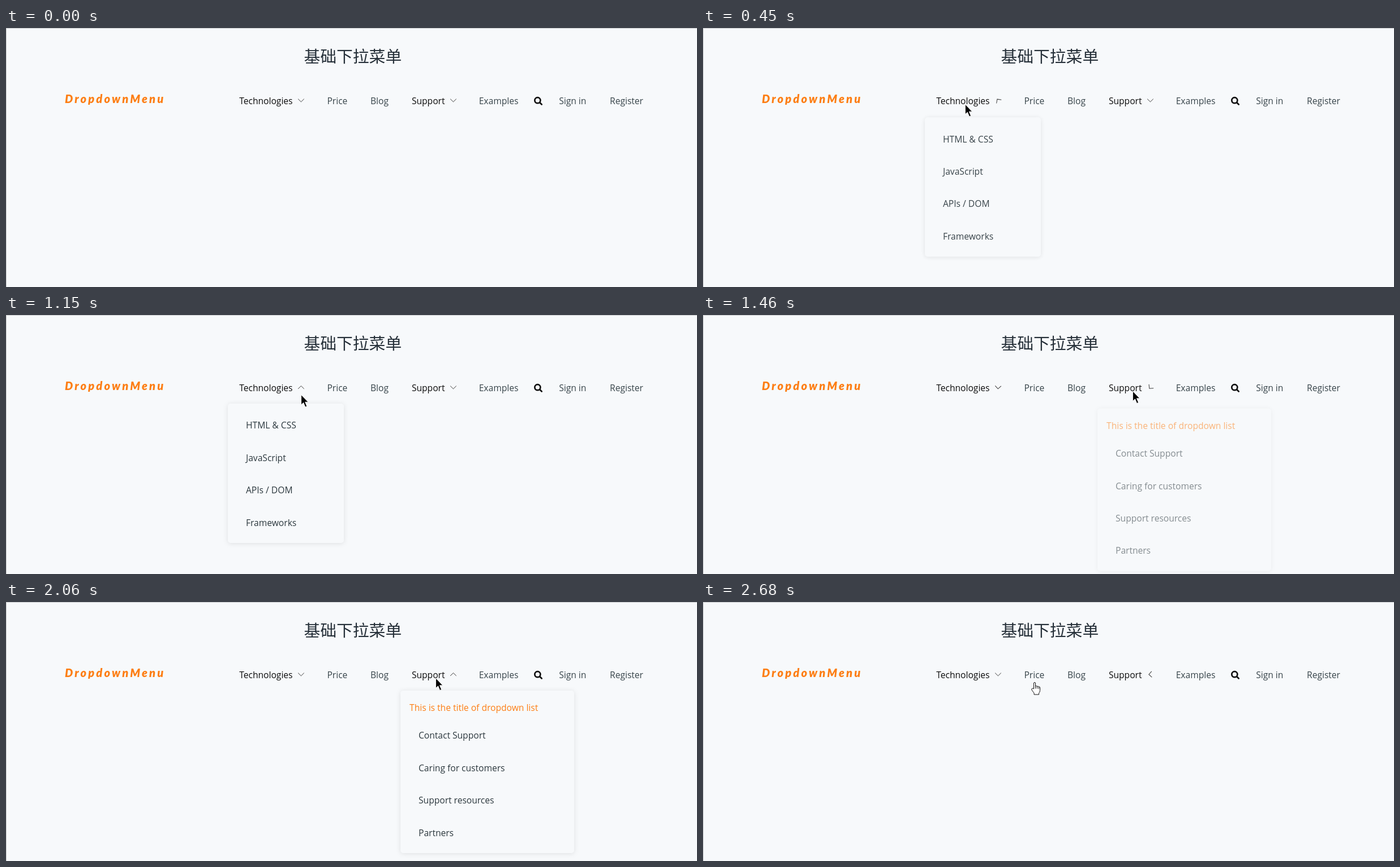
Animation, 1221 px wide and 459 px high, one loop 2770 ms. Source, as an HTML page:

```html
<!DOCTYPE html>
<html lang="en">
<head>
<meta charset="utf-8">
<title>Dropdown menu</title>
<style>
  html, body { margin: 0; width: 100%; height: 100%; overflow: hidden; background: #f7f9fb; }
  svg { display: block; width: 100%; height: 100%; }
  text { font: 15.6px "Open Sans", "Noto Sans", sans-serif; fill: #2c383e; }
  .nav { text-anchor: middle; fill: #37444a; }
  .strong { fill: #0c0c0c; }
  .heading { font: 28.8px "Noto Sans CJK SC", "Noto Sans CJK", sans-serif; fill: #252f38; text-anchor: middle; }
  .brand { font: italic 900 20px Lato, sans-serif; letter-spacing: 3.15px; fill: #fd7e14; }
  .caption { fill: #fd7e14; }
  .panel { fill: #f7f9fb; filter: drop-shadow(0 1px 4px rgba(0, 0, 0, .1)); }
  .hover { fill: #ececec; }
  .chevron { fill: none; stroke: #3c3c3c; stroke-width: 1; }
  .search { fill: none; stroke: #101010; stroke-width: 2.7; stroke-linecap: round; }
</style>
</head>
<body>
<svg id="stage" viewBox="0 0 1221 459" xmlns="http://www.w3.org/2000/svg">
  <path d="M0 .5H1221M.5 0V459" stroke="#c6c8ca"/>
  <text class="heading" x="612.8" y="61.3">基础下拉菜单</text>
  <text class="brand" x="104" y="133">DropdownMenu</text>
  <g class="search"><circle cx="939.3" cy="128.2" r="5"/><path d="M943.3 132.2L946.6 135.5"/></g>
</svg>
<script>
const LOOP = 2770, STEP = LOOP / 36;
const OPEN_MS = 500, CLOSE_MS = 300, SLIDE = 20;
const ITEM_HEIGHT = 57.4, PANEL_TOP = 157;
const stage = document.getElementById("stage");

function add(parent, tag, attrs, text = "") {
  const el = document.createElementNS("http://www.w3.org/2000/svg", tag);
  for (const key in attrs) el.setAttribute(key, attrs[key]);
  el.textContent = text;
  return parent.appendChild(el);
}

function bezier(x1, y1, x2, y2) {
  const at = (a, b, s) => 3 * a * s * (1 - s) ** 2 + 3 * b * s * s * (1 - s) + s ** 3;
  return x => {
    if (x <= 0) return 0;
    if (x >= 1) return 1;
    let low = 0, high = 1;
    for (let i = 0; i < 24; i++) {
      const mid = (low + high) / 2;
      if (at(x1, x2, mid) < x) low = mid; else high = mid;
    }
    return at(y1, y2, low);
  };
}
const ease = bezier(.25, .1, .25, 1);
const easeInOut = bezier(.42, 0, .58, 1);

const navItems = [
  ["Technologies", 459.4, "strong"], ["Price", 585.4], ["Blog", 660],
  ["Support", 746.2, "strong"], ["Examples", 870.5], ["Sign in", 1001.3], ["Register", 1096.5]
];
for (const [label, x, extra = ""] of navItems)
  add(stage, "text", { class: "nav " + extra, x, y: 135 }, label);

function createMenu({ x, width, height, itemsTop, labels, caption, chevronX, opens, closes }) {
  const group = add(stage, "g", {});
  add(group, "rect", { class: "panel", x, y: PANEL_TOP, width, height, rx: 5 });
  const hover = add(group, "rect", { class: "hover", x: x + 8, width: width - 16, height: ITEM_HEIGHT });
  if (caption) add(group, "text", { class: "caption", x: x + 16, y: 193.3 }, caption);
  labels.forEach((label, i) =>
    add(group, "text", { x: x + 32, y: itemsTop + 35.4 + i * ITEM_HEIGHT }, label));
  const chevron = add(stage, "path", { class: "chevron", d: "M-5.3 -2.6L0 2.6L5.3 -2.6" });

  const isOpen = time => time >= opens && time < closes;
  const itemAt = (time, point) => {
    const index = Math.floor((point.y - itemsTop) / ITEM_HEIGHT);
    const inside = point.x > x + 8 && point.x < x + width - 8;
    return isOpen(time) && inside && index >= 0 && index < labels.length ? index : -1;
  };

  function draw(time, point) {
    const progress = (time - opens) / OPEN_MS;
    const shown = isOpen(time) ? ease(progress) : 0;
    group.setAttribute("opacity", shown);
    group.setAttribute("transform", `translate(0 ${SLIDE * (1 - shown)})`);
    const turn = time < closes ? easeInOut(progress) : 1 - easeInOut((time - closes) / CLOSE_MS);
    chevron.setAttribute("transform", `translate(${chevronX} 128.3) rotate(${180 * turn})`);
    const index = itemAt(time, point);
    hover.setAttribute("visibility", index < 0 ? "hidden" : "visible");
    hover.setAttribute("y", itemsTop + Math.max(index, 0) * ITEM_HEIGHT);
  }
  return { draw, itemAt };
}

const menus = [
  createMenu({
    x: 392, width: 205, height: 247, itemsTop: 166, chevronX: 521.4, opens: 115, closes: 1190,
    labels: ["HTML & CSS", "JavaScript", "APIs / DOM", "Frameworks"]
  }),
  createMenu({
    x: 697, width: 307, height: 288, itemsTop: 207, chevronX: 790.4, opens: 1300, closes: 2540,
    caption: "This is the title of dropdown list",
    labels: ["Contact Support", "Caring for customers", "Support resources", "Partners"]
  })
];

const arrow = add(stage, "path", {
  d: "M0 0V17.5L4 13.8L7.2 21.5L10 20.3L6.9 12.8H12.2Z",
  fill: "#000", stroke: "#fff", "stroke-width": .8
});
const hand = add(stage, "path", {
  d: "M-1.5 11.5V1.5Q-1.5 0 0 0T1.5 1.5V6.5Q3 5.3 4.3 7Q6 6 7.2 7.8Q9.5 7 9.5 9.5V14" +
     "Q9.5 17 7.5 19V21.5H-1V19L-5 13.5Q-6 11 -4 10.5Q-2.5 10.3 -1.5 11.5Z" +
     "M1.5 6.5V11M4.3 7V11M7.2 7.8V11.5",
  fill: "#fff", stroke: "#111", "stroke-width": 1, "stroke-linejoin": "round"
});

// Pointer route: time, x, y
const route = [
  [70, 468, 148], [150, 462, 125], [310, 462, 125], [530, 464, 140], [600, 468, 160],
  [690, 476, 205], [769, 479.8, 238], [846, 483, 249], [923, 488, 235], [1000, 497, 200],
  [1077, 505, 162], [1154, 521.5, 141.5], [1231, 588, 143], [1308, 657, 144], [1385, 730, 140],
  [1462, 759.5, 135], [2060, 759.5, 135], [2154, 764, 165], [2231, 772, 200], [2308, 778, 235],
  [2370, 779.5, 246.5], [2462, 779.5, 246.5], [2539, 768, 190], [2616, 690, 150], [2693, 586, 142.5]
];

function pointerAt(time) {
  const next = route.findIndex(stop => stop[0] > time);
  if (next < 1) {
    const [, x, y] = route[next < 0 ? route.length - 1 : 0];
    return { x, y };
  }
  const [t0, x0, y0] = route[next - 1], [t1, x1, y1] = route[next];
  const k = (time - t0) / (t1 - t0);
  return { x: x0 + (x1 - x0) * k, y: y0 + (y1 - y0) * k };
}

function render(now) {
  const time = Math.floor((now % LOOP + 14) / STEP) % 36 * STEP;
  const point = pointerAt(time);
  for (const menu of menus) menu.draw(time, point);

  const onNavLink = point.y < PANEL_TOP && point.x > 548 && point.x < 690;
  const onLink = onNavLink || menus.some(menu => menu.itemAt(time, point) >= 0);
  const visible = time >= route[0][0];
  for (const [shape, active] of [[hand, onLink], [arrow, !onLink]]) {
    shape.setAttribute("visibility", visible && active ? "visible" : "hidden");
    shape.setAttribute("transform", `translate(${point.x} ${point.y})`);
  }
}

const start = performance.now();
function tick() {
  render(performance.now() - start);
  requestAnimationFrame(tick);
}
tick();
</script>
</body>
</html>
```
